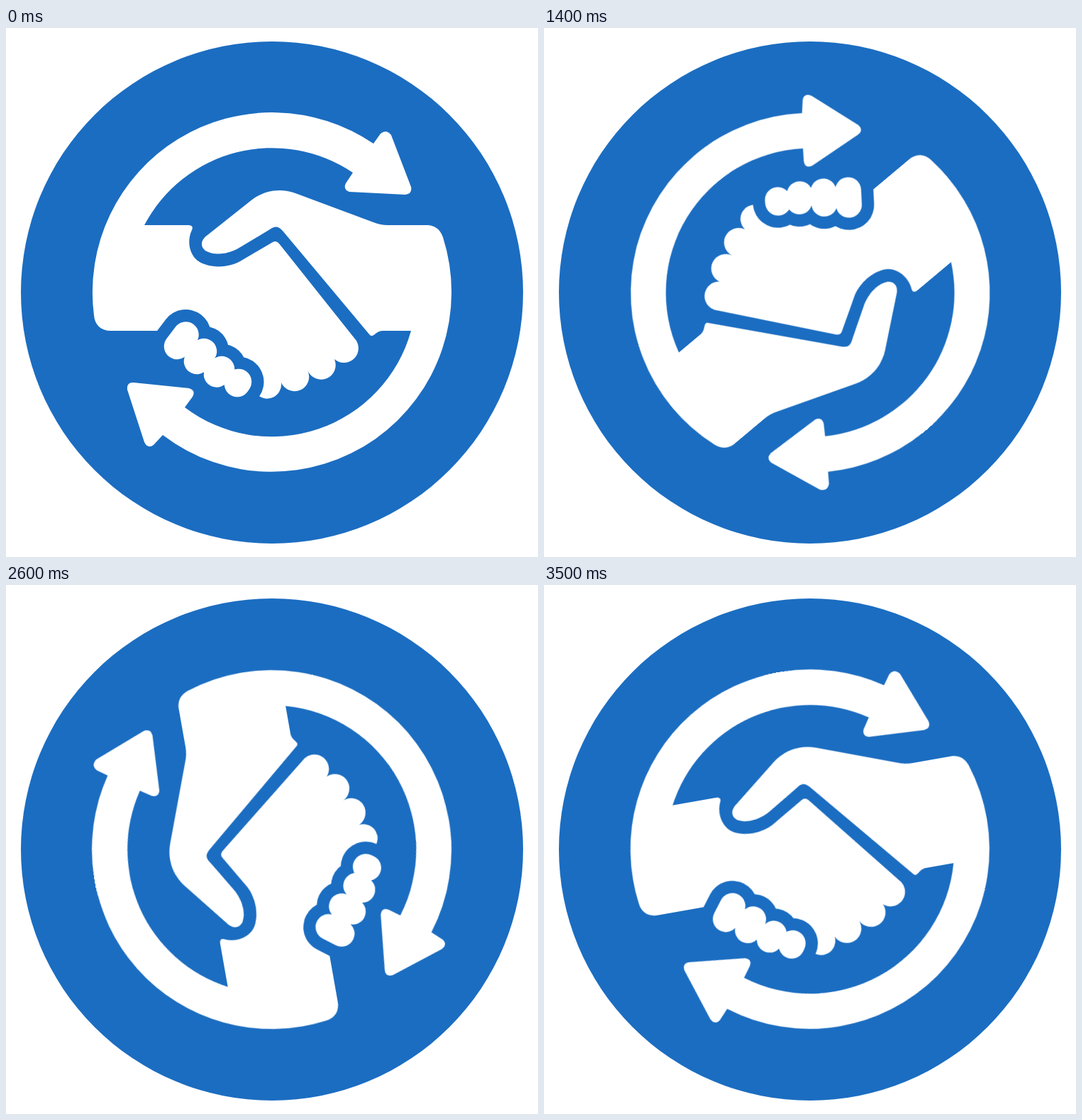
An HTML page that plays this animation: 750 by 746 pixels, repeating every 3.6 s.

```html
<!DOCTYPE html>
<html lang="en">
<head>
<meta charset="utf-8">
<title>Turning handshake</title>
<style>
  html, body { margin: 0; width: 100%; height: 100%; overflow: hidden; background: #fff; }
  svg { display: block; width: 750px; height: 746px; }
  .disc { fill: #1b6dc1; }
  .turn { fill: #fff; transform-origin: 375px 373px; animation: turn 3.6s steps(36) infinite; }
  .fingers { fill: none; stroke: #fff; stroke-width: 36.5; stroke-linecap: round; }
  .gap { stroke: #1b6dc1; stroke-width: 71; }
  @keyframes turn { to { transform: rotate(360deg); } }
</style>
</head>
<body>
<svg viewBox="0 0 750 746">
  <defs>
    <path id="fingers" d="M253.5 432.5L241 449M279 456L269 470M304 481L297 488.5M328 499L326 502"/>
  </defs>
  <circle class="disc" cx="375" cy="373" r="354"/>
  <g class="turn">
    <!-- left arm, upper arrow and palm -->
    <path d="M213 427H148C134 427 125 419 124 405
      A253.5 253.5 0 0 1 518 163L528 149Q536 142 543 151
      L571 224Q573 234 563 235L484 231Q475 228 479 219L489 204
      A203.5 203.5 0 0 0 195 278H258Q265 279 262 285
      C255 300 258 318 270 328C285 339 312 339 330 329
      L376 302Q381 299 385 304L494 441
      A20.5 20.5 0 0 1 463 467A20 20 0 0 1 425.500 483.500
      A20 20 0 0 1 388 500A20 20 0 0 1 350 511L260 427Z"/>
    <!-- right arm, thumb and lower arrow -->
    <path d="M284 292L347 242C364 229 387 225 408 233
      L518 274Q528 278 538 278H592C605 278 612 284 616 295
      A253.5 253.5 0 0 1 221 574L208 588Q200 594 195 584
      L171 510Q170 499 180 500L258 508Q268 511 263 520L252 535
      A203.5 203.5 0 0 0 571 427H531Q526 427 521 431Q516 436 513 433
      L390 286Q382 276 372 284L327 311
      C312 319 295 321 283 315C274 310 273 300 284 292Z"/>
    <use href="#fingers" class="fingers gap"/>
    <use href="#fingers" class="fingers"/>
  </g>
</svg>
</body>
</html>
```
